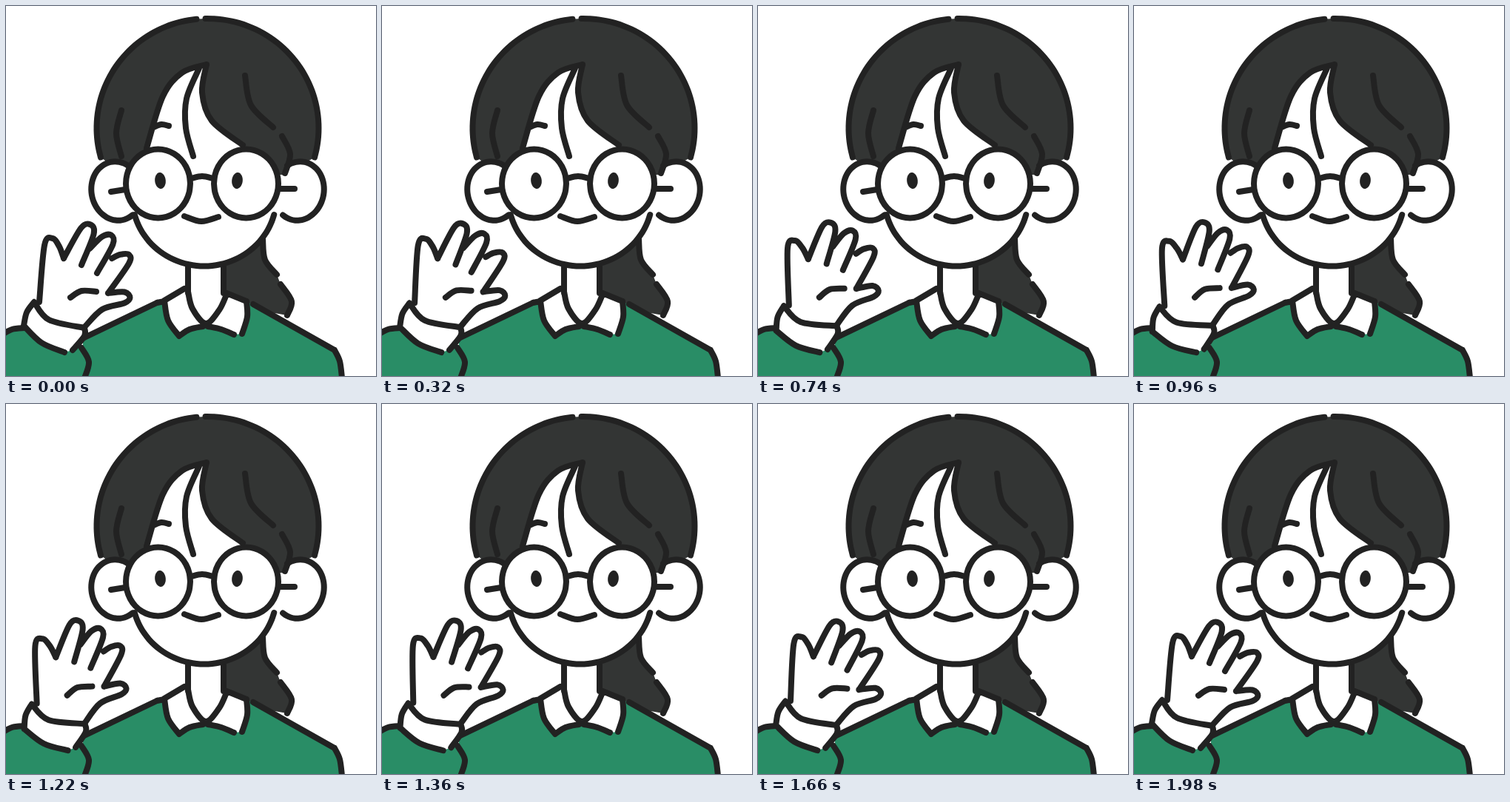
Write an HTML page with a canvas that moves like this. It is 500 px wide and 500 px high and loops after 2000 ms.

```html
<!DOCTYPE html>
<html lang="en">
<head>
<meta charset="utf-8">
<title>Waving hello</title>
<style>
html, body { margin: 0; width: 100%; height: 100%; overflow: hidden; background: #fff; }
canvas { display: block; }
</style>
</head>
<body>
<canvas id="stage" width="500" height="500"></canvas>
<script>
const ctx = document.getElementById('stage').getContext('2d');
const { PI, sin, cos } = Math;
const INK = '#222222', HAIR = '#333534', GREEN = '#298d66', WHITE = '#ffffff';
const LOOP = 2000, SWING = 7.8 * PI / 180;
const WRIST = [83, 430];

// Points along an ellipse between two angles
function arc(cx, cy, rx, ry, from = 0, to = 2 * PI, tilt = 0) {
  const n = 24;
  return Array.from({ length: n + 1 }, (_, i) => {
    const t = from + (to - from) * i / n;
    const u = rx * cos(t), v = ry * sin(t);
    return [cx + u * cos(tilt) - v * sin(tilt), cy + u * sin(tilt) + v * cos(tilt)];
  });
}

// Outline of a finger with a round tip, bent to the right by an angle
function finger(start, [cx, cy], bend, r, ...end) {
  const dx = r * sin(bend), dy = -r * cos(bend);
  return [start, [cx + dy, cy - dx], [cx + dx, cy + dy], [cx - dy, cy + dx], ...end];
}

// Smooth curve through points
function spline(path, p, joined) {
  joined ? path.lineTo(...p[0]) : path.moveTo(...p[0]);
  for (let i = 0; i < p.length - 1; i++) {
    const b = p[i], c = p[i + 1], a = p[i - 1] || b, d = p[i + 2] || c;
    path.bezierCurveTo(
      b[0] + (c[0] - a[0]) / 6, b[1] + (c[1] - a[1]) / 6,
      c[0] - (d[0] - b[0]) / 6, c[1] - (d[1] - b[1]) / 6, c[0], c[1]);
  }
}

function fill(color, ...curves) {
  const path = new Path2D();
  curves.forEach((c, i) => spline(path, c, i > 0));
  ctx.fillStyle = color;
  ctx.fill(path);
}

function line(...curves) {
  const path = new Path2D();
  curves.forEach(c => spline(path, c, false));
  ctx.stroke(path);
}

function outlined(...curves) {
  fill(WHITE, ...curves);
  line(...curves);
}

const flip = curve => [...curve].reverse();
const mirror = (curve, axis) => curve.map(([x, y]) => [2 * axis - x, y]);

function drawHead() {
  const domeL = arc(272.5, 165, 150, 148, PI - 0.27, 1.5 * PI - 0.1);
  const domeR = arc(272.5, 165, 150, 148, 1.5 * PI - 0.02, 2 * PI + 0.27);
  const fringeL = [[271, 79], [238, 90], [212, 122], [190, 192]];
  const fringeR = [[271, 79], [265, 117], [278, 155], [320, 188]];
  const jaw = arc(268, 258, 97.5, 93.5, 0.26, PI - 0.26);
  const ear = arc(149.5, 250, 34, 40, -0.87, 1.13 - 2 * PI + 2 * PI * 0, -0.2).length
    && arc(149.5, 250, 34, 40, -0.87, 1.13 - 2 * PI, -0.2);

  fill(HAIR, domeL, domeR, [[377, 228], [160, 228]]);
  outlined(ear);
  outlined(mirror(ear, 272.5));
  fill(WHITE, flip(fringeL), fringeR, jaw);
  line(domeL, domeR, fringeL, fringeR, jaw,
    [[261, 84], [244, 125], [243, 165], [253, 203]],
    [[156, 141], [149, 172], [156, 203]],
    [[323, 94], [331, 134], [361, 164]],
    [[373, 176], [384, 200], [377, 226]],
    [[199, 164], [210, 160], [220, 162]],
    [[142, 251], [161, 248]], [[371, 247], [390, 247]]);

  const lens = arc(205.5, 240, 43.5, 46.5);
  outlined(lens);
  outlined(mirror(lens, 265));
  line([[250, 233], [265, 230], [280, 233]], [[241, 284], [264, 291], [287, 285]]);

  const eye = arc(208.5, 236, 7.3, 11, 0, 2 * PI, -0.1);
  fill(INK, eye);
  fill(INK, mirror(eye, 260.5));
}

function drawBody() {
  const tailTop = [[347, 315], [350, 343], [366, 363]];
  const tailEnd = [[371, 376], [386, 399], [380, 418]];
  const shoulderL = [[104, 449], [204, 401]];
  const shoulderR = [[334, 403], [444, 465]];
  const side = [[444, 465], [451, 480], [454, 502]];
  const sleeve = [[-5, 444], [8, 437], [25, 435]];
  const elbow = [[102, 462], [112, 481], [106, 503]];
  const neck = [[246, 352], [246, 388]];
  const vee = [[246, 386], [252, 409], [270, 429], [288, 411], [298, 390]];
  const collarL = [[[241, 382], [214, 398]], [[214, 398], [219, 425], [234, 446]], [[234, 446], [248, 437], [266, 433]]];
  const collarR = [[[298, 388], [325, 399]], [[325, 399], [326, 420], [319, 443]], [[308, 444], [291, 437], [273, 433]]];

  fill(HAIR, [[294, 340], [347, 315]], tailTop, tailEnd, [[335, 410], [294, 395]]);
  line(tailTop, tailEnd);
  fill(GREEN, shoulderL, [[214, 399], [325, 400]], shoulderR, side, [[104, 502]]);
  fill(GREEN, sleeve, [[60, 450], [102, 462]], elbow, [[-5, 503]]);
  fill(WHITE, neck, vee, [[294, 345]]);
  fill(WHITE, ...collarL, flip(vee.slice(0, 3)));
  fill(WHITE, ...collarR, vee.slice(2));
  line(shoulderL, [[204, 401], [214, 399]], shoulderR, side, sleeve, elbow,
    vee, ...collarL, ...collarR, neck, mirror(neck, 270));
}

function drawHand(angle) {
  const fingers = [
    finger([45, 400], [62, 324], 0.1, 10, [78, 341]),
    finger([78, 341], [110, 304], 0.45, 9.5, [102, 350]),
    finger([113, 328], [137, 317], 0.6, 9, [123, 361]),
    finger([143, 341], [160, 342], 0.8, 8.5, [138, 388]),
    finger([138, 388], [160, 394], 1.6, 7.5, [130, 410], [106, 434])
  ];
  const cuff = [
    [[38, 400], [58, 424], [106, 435]],
    [[106, 435], [106, 446], [90, 465]],
    [[79, 468], [48, 455], [24, 432]],
    [[24, 432], [28, 414], [38, 400]]
  ];
  ctx.save();
  ctx.translate(...WRIST);
  ctx.rotate(angle);
  ctx.translate(-WRIST[0], -WRIST[1]);
  outlined(...fingers);
  line([[87, 394], [102, 385], [122, 386]]);
  outlined(...cuff);
  ctx.restore();
}

function draw(time) {
  const sway = (1 - cos(time / LOOP * 2 * PI)) / 2;
  ctx.fillStyle = WHITE;
  ctx.fillRect(0, 0, 500, 500);
  ctx.strokeStyle = INK;
  ctx.lineWidth = 8;
  ctx.lineCap = ctx.lineJoin = 'round';
  drawBody();
  drawHead();
  drawHand(-SWING * sway);
}

let start;
function tick(now) {
  start ??= now;
  draw((now - start) % LOOP);
  requestAnimationFrame(tick);
}
draw(0);
requestAnimationFrame(tick);
</script>
</body>
</html>
```
